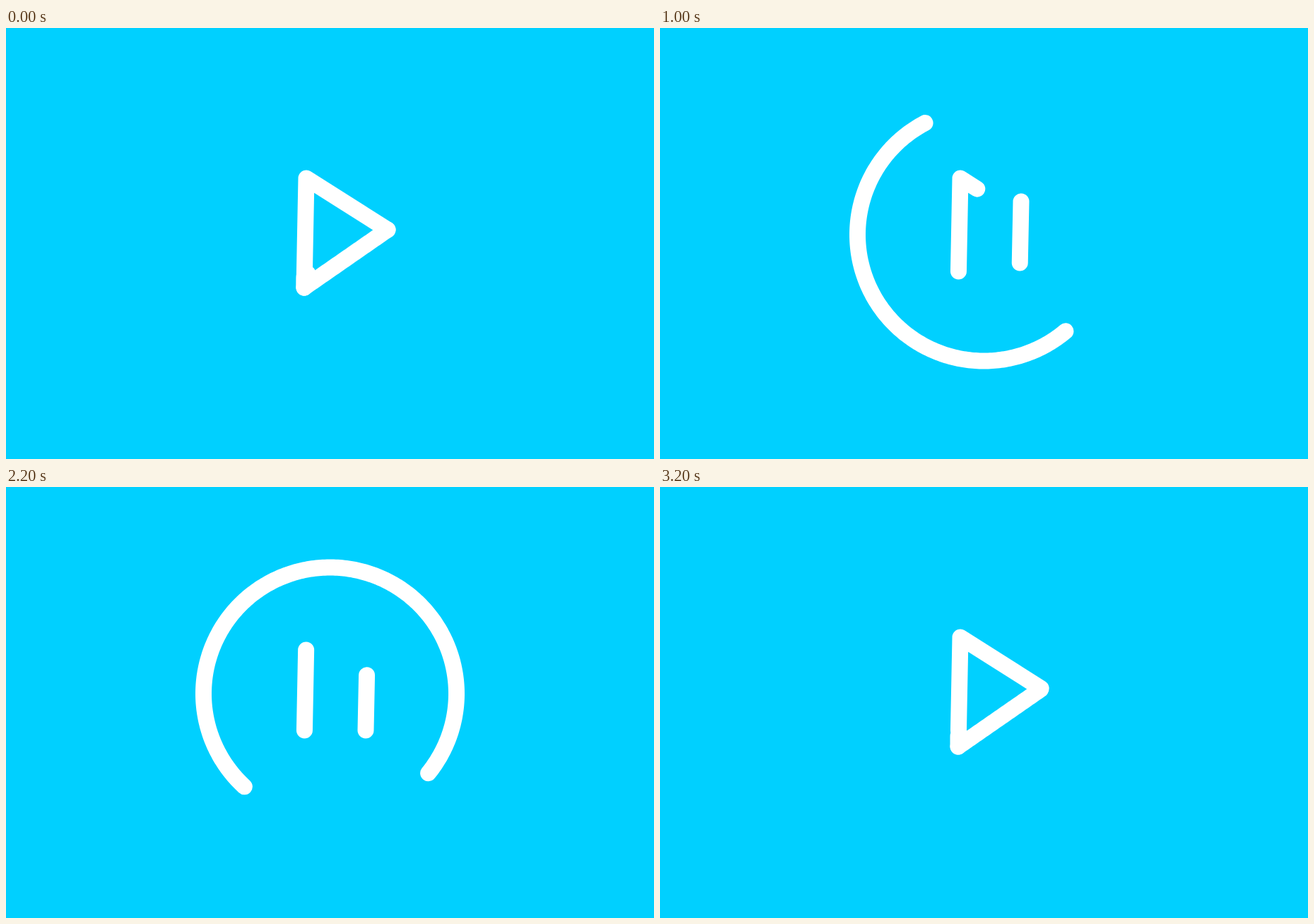
An HTML page for the animation above (3.22 s loop, 917 by 611 pixels).

```html
<!DOCTYPE html>
<html lang="en">
<head>
<meta charset="utf-8">
<title>Play and pause</title>
<style>
  html, body { margin: 0; width: 100%; height: 100%; overflow: hidden; background: #00d0ff; }
  svg { display: block; width: 100vw; height: 100vh; }
  path { fill: none; stroke: #fff; stroke-width: 23; stroke-linecap: round; stroke-linejoin: round; }
</style>
</head>
<body>
<svg viewBox="0 0 917 611">
  <path id="leg" d="M422 368L425 213L540 286"/>
  <path id="bar" d="M511 246L509 345C507 372 470 348 444 348L428 348Q422 348 422 354L422 368"/>
  <path id="arc"/>
</svg>
<script>
const LOOP = 3220, STEP = 20;
const CX = 458.5, CY = 293, R = 179, HALF = Math.PI * R;
const OPEN = 400, PAUSED = 1620, CLOSE = 1800;
const [leg, bar, arc] = ['leg', 'bar', 'arc'].map(id => document.getElementById(id));

// From the top of the circle inward to the tip and the lower corner of the triangle
const curl = document.createElementNS('http://www.w3.org/2000/svg', 'path');
curl.setAttribute('d', 'M458.5 114C508 114 548 131.5 571 170.5' +
  'C582 194 582 228 567.5 258Q558 273.5 540 286L422 368');

const LEG = leg.getTotalLength(), BAR = bar.getTotalLength(), CURL = curl.getTotalLength();
const TIP = CURL - Math.hypot(118, 82);
const LEG_PAUSED = 122, BAR_PAUSED = 99, FOOT = 23;

// Eased change from a to b; a larger p softens the start, a larger q the stop
function move(t, start, end, a, b, p, q) {
  const u = Math.min(1, Math.max(0, (t - start) / (end - start)));
  return a + (b - a) * (1 - (1 - u ** p) ** q);
}

const fade = (t, span) => Math.exp(-(t - OPEN) / span);

// Ends of each stroke, as distances along its path
function openPose(time) {
  const t = Math.max(time, OPEN);
  const bounce = Math.sin(Math.PI * Math.min(1, Math.max(0, (t - 740) / 520)));
  const tailRest = 150, headBase = 127, headSpeed = 0.935;
  return {
    leg: [move(t, OPEN, 800, 0, FOOT, 1, 1.5), move(t, OPEN, 1450, LEG, LEG_PAUSED, 1, 1.2)],
    bar: [move(t, OPEN, 800, BAR - FOOT, 0, 1.5, 2),
          move(t, OPEN, 740, BAR, BAR_PAUSED, 1.5, 2) - 12 * bounce],
    arc: [tailRest - (tailRest + CURL) * fade(t, 276),
          headBase + headSpeed * (t - OPEN) - (headBase + TIP) * fade(t, 80)],
    curling: 1
  };
}

function closePose(t) {
  return {
    leg: [FOOT, move(t, CLOSE, LOOP, LEG_PAUSED, LEG - 1, 3.56, 8.5)],
    bar: [move(t, CLOSE, LOOP, 0, BAR - 19, 3.4, 8.4),
          move(t, 2300, LOOP, BAR_PAUSED, BAR, 2, 5.15)],
    arc: [move(t, CLOSE, 2560, -HALF, -190, 2.2, 2) + move(t, 2560, 3200, 0, 190 - CURL, 2, 2.57),
          move(t, CLOSE, 2720, HALF, 239, 1.75, 2) - move(t, 2640, LOOP, 0, 246 + TIP, 3, 2)],
    curling: move(t, 2200, 2560, 0, 1, 2, 2)
  };
}

// Positive s runs counter-clockwise from the top; negative s bends from the circle to the curl
function arcPoint(s, curling) {
  const x = CX - R * Math.sin(s / R), y = CY - R * Math.cos(s / R);
  if (s >= 0) return [x, y];
  const p = curl.getPointAtLength(-s);
  return [x + (p.x - x) * curling, y + (p.y - y) * curling];
}

function arcPath([from, to], curling) {
  const n = Math.max(1, Math.ceil(Math.abs(to - from) / 3));
  const points = Array.from({ length: n + 1 }, (_, i) =>
    arcPoint(from + (to - from) * i / n, curling).map(v => v.toFixed(2)).join(' '));
  return 'M' + points.join('L');
}

function trim(path, [from, to]) {
  path.setAttribute('stroke-dasharray', `${Math.max(0.01, to - from)} 2000`);
  path.setAttribute('stroke-dashoffset', -from);
}

function draw(t) {
  const pose = t < PAUSED ? openPose(t) : closePose(t);
  trim(leg, pose.leg);
  trim(bar, pose.bar);
  arc.setAttribute('d', arcPath(pose.arc, pose.curling));
}

const start = performance.now();
function tick() {
  const t = (performance.now() - start) % LOOP;
  draw(Math.floor(t / STEP) * STEP);
  requestAnimationFrame(tick);
}
tick();
</script>
</body>
</html>
```
